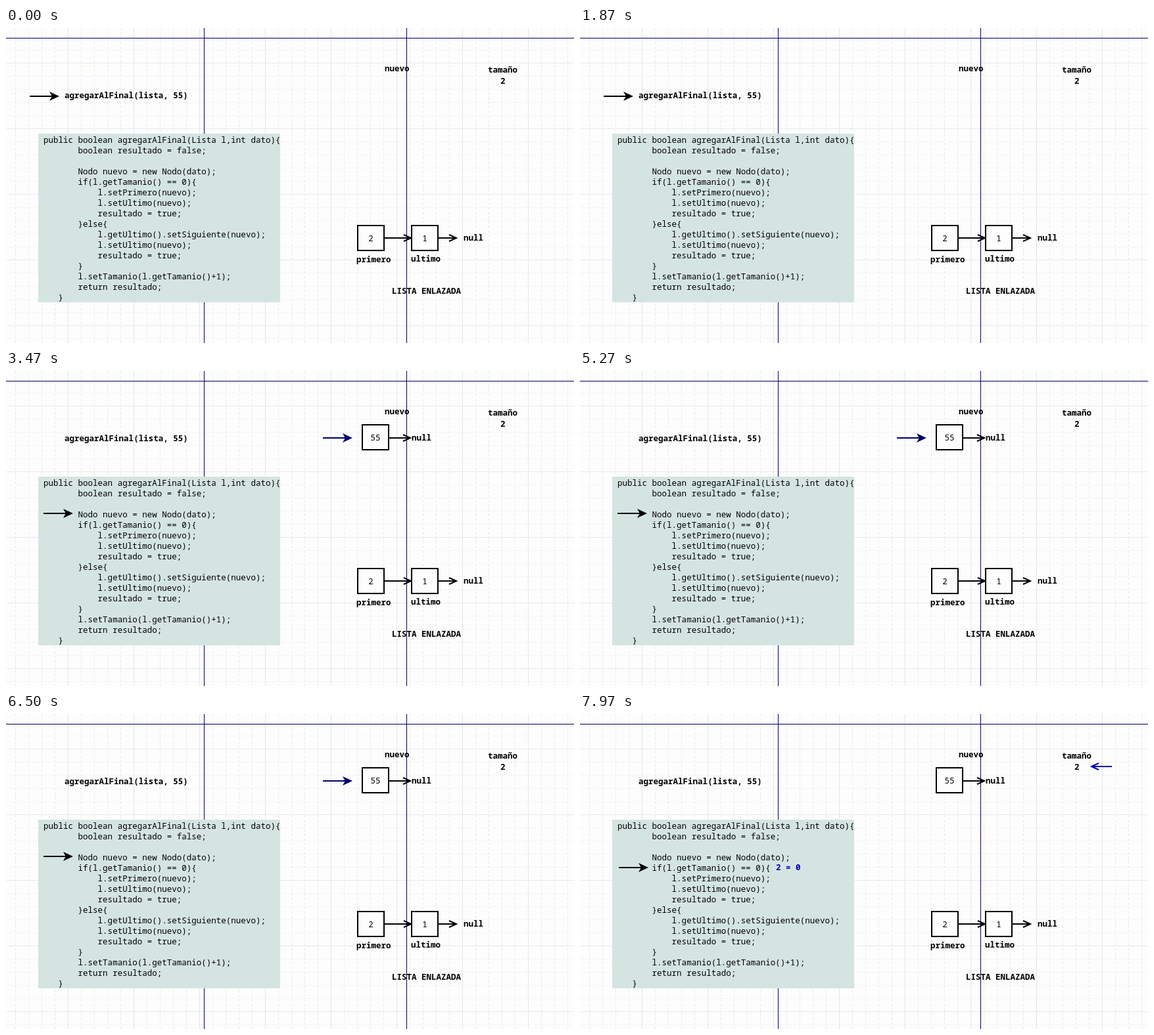
Write an HTML page with a canvas that moves like this. It is 864 px wide and 480 px high and loops after 8000 ms.

```html
<!DOCTYPE html>
<html lang="es">
<head>
<meta charset="utf-8">
<title>Lista enlazada</title>
<style>
html, body { margin: 0; width: 100%; height: 100%; overflow: hidden; background: #fdfdfd; }
canvas { display: block; }
</style>
</head>
<body>
<canvas id="stage" width="864" height="480"></canvas>
<script>
const ctx = document.getElementById('stage').getContext('2d');
const W = 864, H = 480, LOOP = 8000;
const PAPER = '#fdfdfd', PANEL = '#d4e4e1', INK = '#000', RULE = '#000066';
const NAVY = '#000066', BLUE = '#0000b4';
const FONT = '12.52px "Noto Sans Mono", "DejaVu Sans Mono", monospace';
const CREATE_AT = 3230, COMPARE_AT = 6870;

const CODE = `public boolean agregarAlFinal(Lista l,int dato){
       boolean resultado = false;

       Nodo nuevo = new Nodo(dato);
       if(l.getTamanio() == 0){
           l.setPrimero(nuevo);
           l.setUltimo(nuevo);
           resultado = true;
       }else{
           l.getUltimo().setSiguiente(nuevo);
           l.setUltimo(nuevo);
           resultado = true;
       }
       l.setTamanio(l.getTamanio()+1);
       return resultado;
   }`.split('\n');

function line(x1, y1, x2, y2, color, width = 1, dash = []) {
  ctx.strokeStyle = color;
  ctx.lineWidth = width;
  ctx.setLineDash(dash);
  ctx.beginPath();
  ctx.moveTo(x1, y1);
  ctx.lineTo(x2, y2);
  ctx.stroke();
  ctx.setLineDash([]);
}

function text(str, x, y, weight = 700, color = INK) {
  ctx.font = weight + ' ' + FONT;
  ctx.fillStyle = color;
  ctx.fillText(str, x, y);
}

function grid() {
  for (let y = 13.5; y < H; y += 20) {
    const major = (y - 53.5) % 100 === 0;
    line(0, y, W, y, major ? '#e6eaee' : '#eeeef2', 1, major ? [] : [2, 2]);
  }
  for (let x = 14.5; x < W; x += 20) {
    const major = (x - 94.5) % 100 === 0;
    line(x, 0, x, H, major ? '#e2e8e4' : '#ebebda', 1, major ? [] : [4, 3]);
  }
  line(0, 15.5, W, 15.5, RULE);
  line(301.5, 0, 301.5, H, RULE);
  line(609.5, 0, 609.5, H, RULE);
}

function pointer(x, y, color = INK) {
  line(x, y, x + 36, y, color, 2);
  ctx.fillStyle = color;
  ctx.beginPath();
  ctx.moveTo(x + 45, y);
  ctx.lineTo(x + 30, y - 7);
  ctx.lineTo(x + 34, y);
  ctx.lineTo(x + 30, y + 7);
  ctx.fill();
}

function link(from, to, y, color = INK) {
  const back = to - Math.sign(to - from) * 11;
  line(from, y, to, y, color, 2);
  ctx.beginPath();
  ctx.moveTo(back, y - 5);
  ctx.lineTo(to, y);
  ctx.lineTo(back, y + 5);
  ctx.stroke();
}

function node(value, x, y) {
  ctx.fillStyle = PAPER;
  ctx.fillRect(x, y, 42, 40);
  ctx.strokeStyle = INK;
  ctx.lineWidth = 2;
  ctx.strokeRect(x + 1, y + 1, 40, 38);
  ctx.textAlign = 'center';
  text(value, x + 21, y + 25, 500);
  ctx.textAlign = 'left';
}

function scene() {
  ctx.fillStyle = PAPER;
  ctx.fillRect(0, 0, W, H);
  grid();

  ctx.fillStyle = PANEL;
  ctx.fillRect(49, 161, 368, 257);
  CODE.forEach((row, i) => text(row, 57, 175 + i * 16, 500));

  text('agregarAlFinal(lista, 55)', 89, 107);
  text('nuevo', 576, 66);
  text('tamaño', 733, 68);
  text('2', 752, 85);

  link(576, 616, 320);
  link(658, 685, 320);
  node('2', 534, 300);
  node('1', 616, 300);
  text('null', 696, 324);
  text('primero', 533, 357);
  text('ultimo', 616, 356);
  text('LISTA ENLAZADA', 587, 405);
}

function draw(t) {
  scene();
  if (t < CREATE_AT) {
    pointer(36, 104);
    return;
  }
  node('55', 541, 81);
  link(583, 615, 102);
  text('null', 617, 106);
  if (t < COMPARE_AT) {
    pointer(57, 217);
    pointer(482, 102, NAVY);
  } else {
    pointer(59, 234);
    text('2 = 0', 298, 238, 700, BLUE);
    link(809, 778, 80, BLUE);
  }
}

const start = performance.now();
function tick() {
  draw((performance.now() - start) % LOOP);
  requestAnimationFrame(tick);
}
tick();
</script>
</body>
</html>
```
